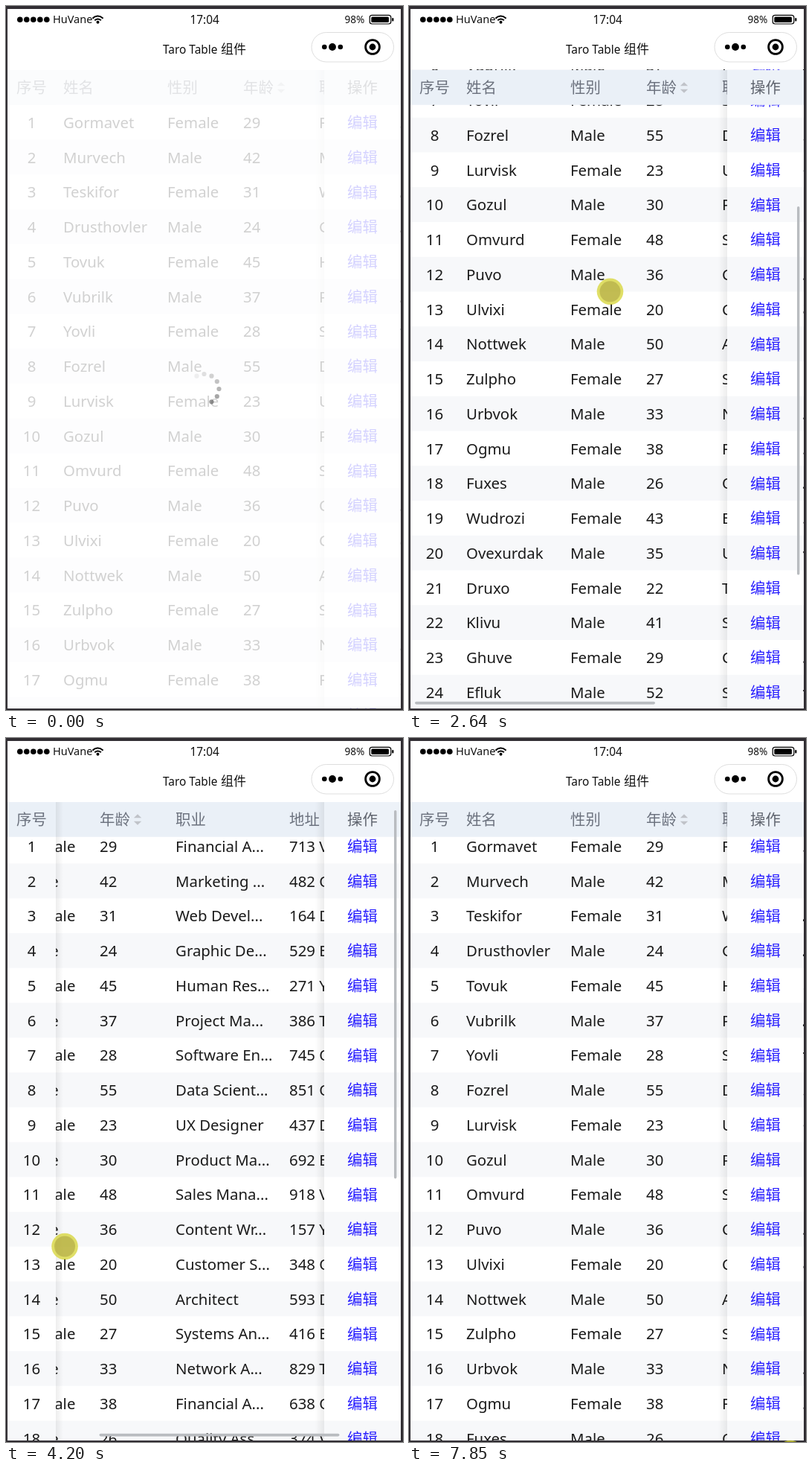
Recreate the animation shown at these times as an HTML page with a canvas. Size 534x945 px, loop 7920 ms.

```html
<!DOCTYPE html>
<html lang="zh">
<head>
<meta charset="utf-8">
<title>Taro Table</title>
<style>
html, body { margin: 0; width: 100%; height: 100%; overflow: hidden; background: #fff; }
canvas { display: block; width: 534px; height: 945px; }
</style>
</head>
<body>
<canvas id="stage"></canvas>
<script>
const W = 534, H = 945, LOOP = 7920;
const canvas = document.getElementById('stage');
const ctx = canvas.getContext('2d');
const dpr = window.devicePixelRatio || 1;
canvas.width = W * dpr;
canvas.height = H * dpr;
ctx.scale(dpr, dpr);

const LATIN = '"Noto Sans", "Open Sans", sans-serif';
const CJK = '"Noto Sans CJK SC", "Noto Sans CJK", sans-serif';
const INK = '#1a1a1a', LINK = '#2a20ff', HEAD_BG = '#eaf0f7', HEAD_INK = '#6c727e';
const ROW = 46.75, TOP = 86, BODY = TOP + ROW, LEFT = 2, RIGHT = 531, BOTTOM = 943;
const FIX_L = 67, FIX_R = 428, FIX_END = 530;
const MAX_H = 299;

// name | sex | age | job | address
const people = `Gormavet|F|29|Financial A...|713 Velph St
Murvech|M|42|Marketing ...|482 Quib Ave
Teskifor|F|31|Web Devel...|164 Drovu Ln
Drusthovler|M|24|Graphic De...|529 Ezk Blvd
Tovuk|F|45|Human Res...|271 Ymo Dr
Vubrilk|M|37|Project Ma...|386 Trelb Rd
Yovli|F|28|Software En...|745 Quolve Ct
Fozrel|M|55|Data Scient...|851 Quib Ave
Lurvisk|F|23|UX Designer|437 Drovu St
Gozul|M|30|Product Ma...|692 Ezk Ave
Omvurd|F|48|Sales Mana...|918 Velph Blvd
Puvo|M|36|Content Wr...|157 Ymo Rd
Ulvixi|F|20|Customer S...|348 Quib Ct
Nottwek|M|50|Architect|593 Drovu Ln
Zulpho|F|27|Systems An...|416 Ezk Blvd
Urbvok|M|33|Network A...|829 Trelb Dr
Ogmu|F|38|Financial A...|638 Quolve Rd
Fuxes|M|26|Quality Ass...|374 Velph St
Wudrozi|F|43|Event Plan...|265 Quib Ave
Ovexurdak|M|35|UI Designer|951 Drovu Ln
Druxo|F|22|Teacher|148 Ezk Blvd
Klivu|M|41|Sales Mana...|537 Ymo Dr
Ghuve|F|29|Content Wr...|726 Trelb Rd
Efluk|M|52|Software En...|843 Quolve Ct
Wiv|F|21|Accountant|319 Quib Ave
Tozbelvi|F|25|Marketing ...|462 Drovu St
Gukh|M|31|UX Resear...|685 Ezk Ave
Diwu|M|32|IT Support...|974 Velph Blvd
Pungovim|M|34|UI Develop...|183 Ymo Rd
Rozvek|M|39|Consultant|357 Quib Ct`.split('\n').map((line, i) => {
  const [name, sex, age, job, address] = line.split('|');
  return { i, age: +age, cells: [name, sex === 'F' ? 'Female' : 'Male', age, job, address] };
});
const byAge = [...people].sort((a, b) => a.age - b.age || b.i - a.i);
const columns = [['姓名', 77], ['性别', 217], ['年龄', 319], ['职业', 421], ['地址', 574]];

// pointer path: time, x, y
const path = [
  [1550, 274, 922], [1790, 267, 712], [1950, 268, 694], [2180, 268, 693.5], [2330, 269, 640],
  [2410, 269, 585], [2640, 270.5, 383.5], [2790, 271, 350], [2880, 271, 362], [3180, 272, 682.5],
  [3260, 262, 682.5], [3660, -32, 682.5], [3800, -32, 682.5], [4000, -18, 682.5],
  [4580, 262, 682.5], [4680, 272, 680], [4820, 290, 540], [5130, 342, 121], [5440, 340, 118],
  [5980, 340, 117], [6950, 340, 118], [7070, 360, 210], [7310, 490, 919]
];

const clamp = (v, lo, hi) => Math.min(hi, Math.max(lo, v));
const ramp = (t, a, b) => clamp((t - a) / (b - a), 0, 1);
const within = (t, a, b) => t >= a && t < b;

function pointer(t) {
  if (t >= 7850) return [513, 960.5];
  let k = 1;
  while (k < path.length - 1 && path[k][0] < t) k++;
  const [a, x, y] = path[k - 1], [b, u, v] = path[k];
  const p = ramp(t, a, b);
  return [x + (u - x) * p, y + (v - y) * p];
}

function rect(x, y, w, h, color) {
  ctx.fillStyle = color;
  ctx.fillRect(x, y, w, h);
}

function disc(x, y, r, color) {
  ctx.fillStyle = color;
  ctx.beginPath();
  ctx.arc(x, y, r, 0, Math.PI * 2);
  ctx.fill();
}

function pill(x, y, w, h, r, color, line) {
  ctx.beginPath();
  ctx.roundRect(x, y, w, h, r);
  if (line) {
    ctx.strokeStyle = color;
    ctx.lineWidth = line;
    ctx.stroke();
  } else {
    ctx.fillStyle = color;
    ctx.fill();
  }
}

function text(s, x, y, color, size = 20.4, family = LATIN, weight = 400) {
  ctx.font = `${weight} ${size}px ${family}`;
  ctx.fillStyle = color;
  ctx.fillText(s, x, y);
}

const han = (s, x, y, color, size = 20.4) => text(s, x, y, color, size, CJK, 300);
const thin = (s, x, y, size) => text(s, x, y, '#111', size, LATIN, 300);

function clipped(x, y, r, b, draw) {
  ctx.save();
  ctx.beginPath();
  ctx.rect(x, y, r - x, b - y);
  ctx.clip();
  draw();
  ctx.restore();
}

function shade(x0, x1) {
  const g = ctx.createLinearGradient(x0, 0, x1, 0);
  g.addColorStop(0, 'rgba(0,0,0,0)');
  g.addColorStop(1, 'rgba(0,0,0,.07)');
  rect(Math.min(x0, x1), TOP, Math.abs(x1 - x0), BOTTOM - TOP, g);
}

function sortIcon(x, y, color) {
  ctx.fillStyle = color;
  for (const d of [-1, 1]) {
    ctx.beginPath();
    ctx.moveTo(x - 5.2, y + d * 2.2);
    ctx.lineTo(x + 5.2, y + d * 2.2);
    ctx.lineTo(x, y + d * 7.2);
    ctx.fill();
  }
}

function table(sx, sy, sorted) {
  const rows = sorted ? byAge : people;
  const eachRow = fn => rows.forEach((p, i) => {
    const y = BODY + i * ROW - sy;
    if (y < BOTTOM && y + ROW > 84) fn(p, i, y);
  });
  const stripes = (x, r) => eachRow((p, i, y) =>
    rect(x, y, r - x, ROW + .5, i % 2 ? '#f7f8fa' : '#ffffff'));

  stripes(LEFT, RIGHT);
  if (sorted) rect(308.5 - sx, BODY, 102, BOTTOM - BODY, '#ebfbff');
  eachRow((p, i, y) => p.cells.forEach((s, c) => text(s, columns[c][1] - sx, y + 31, INK)));
  rect(LEFT, TOP, RIGHT - LEFT, ROW, HEAD_BG);
  columns.forEach(([s, x]) => han(s, x - sx, 117.3, HEAD_INK));
  sortIcon(370 - sx, 109.5, sorted ? '#a9adb5' : '#c0c3c9');

  shade(416, FIX_R);
  if (sx > 0) shade(FIX_L + 10, FIX_L);

  clipped(LEFT, 85, FIX_L, BOTTOM, () => {
    stripes(LEFT, FIX_L);
    ctx.textAlign = 'center';
    eachRow((p, i, y) => text(i + 1, 34.5, y + 31, INK));
    ctx.textAlign = 'left';
    rect(LEFT, TOP, FIX_L - LEFT, ROW, HEAD_BG);
    han('序号', 14, 117.3, HEAD_INK);
  });
  clipped(FIX_R, 85, FIX_END, BOTTOM, () => {
    stripes(FIX_R, FIX_END);
    eachRow((p, i, y) => han('编辑', 459, y + 31.4, LINK));
    rect(FIX_R, TOP, FIX_END - FIX_R, ROW, '#edf2f8');
    han('操作', 459, 117.3, '#5f646e');
  });
}

function scrollbars(sx, sy, alpha) {
  if (!alpha) return;
  ctx.globalAlpha = alpha;
  pill(522, 90.7 + sy * .575, 3.4, 494.5, 1.7, '#b9bcc0');
  pill(8 + sx * .609, 933.8, 323, 3.6, 1.8, '#b9bcc0');
  ctx.globalAlpha = 1;
}

function loading(t) {
  const alpha = 1 - ramp(t, 1010, 1240);
  if (!alpha) return;
  ctx.globalAlpha = alpha;
  rect(LEFT, 85, RIGHT - LEFT, BOTTOM - 85, 'rgba(255,255,255,.8)');
  const head = 2 + Math.floor((t + 15) / (1000 / 12));
  for (let k = 0; k < 7; k++) {
    const a = (head - k) * Math.PI / 6;
    disc(266.5 + 20 * Math.cos(a), 514 + 20 * Math.sin(a), 3.1, `rgba(70,70,70,${.56 - k * .08})`);
  }
  ctx.globalAlpha = 1;
}

function navBar() {
  rect(LEFT, 3, RIGHT - LEFT, 82, '#fff');
  for (let i = 0; i < 5; i++) disc(18.8 + i * 9, 18.2, 3.8, '#000');
  thin('HuVane', 63, 23, 14.5);
  ctx.strokeStyle = '#000';
  ctx.lineWidth = 2;
  for (const r of [5.6, 9.4]) {
    ctx.beginPath();
    ctx.arc(123.5, 23, r, -Math.PI * .77, -Math.PI * .23);
    ctx.stroke();
  }
  disc(123.5, 21.8, 2, '#000');
  thin('17:04', 247.5, 23.6, 15.4);
  thin('98%', 455.5, 23.4, 13.6);
  pill(489.2, 12.4, 28.6, 11.6, 3, '#000', 1.2);
  pill(491.3, 14.4, 23.6, 7.6, 1.5, '#000');
  pill(519.2, 16, 2.2, 4.6, 1, '#000');

  thin('Taro Table', 211, 63.8, 15.4);
  han('组件', 289, 64, '#111', 17);
  pill(411, 35.5, 110.5, 39.5, 19.75, '#dedede', 1);
  disc(428.3, 55, 3.3, '#000');
  disc(439, 55, 4.9, '#000');
  disc(449.8, 55, 3.3, '#000');
  disc(493, 55, 4.4, '#000');
  ctx.strokeStyle = '#000';
  ctx.lineWidth = 2.8;
  ctx.beginPath();
  ctx.arc(493, 55, 9.4, 0, Math.PI * 2);
  ctx.stroke();
}

function bezel() {
  const c = '#312e33';
  rect(0, 0, W, 4, c);
  rect(0, 0, 2, H, c);
  rect(RIGHT, 0, 3, H, c);
  rect(0, BOTTOM, W, 2, c);
}

function drawPointer(t, x, y, pressed) {
  if (!within(t, 1550, 7375) && t < 7850) return;
  if (pressed) {
    disc(x, y, 17.8, 'rgba(214,212,50,.74)');
    disc(x, y, 14, 'rgba(130,115,40,.32)');
  } else {
    disc(x, y, 17.2, 'rgba(120,120,120,.55)');
    disc(x, y, 13.6, 'rgba(70,70,70,.42)');
  }
}

function render(t) {
  const [x, y] = pointer(t);
  const dragging = within(t, 2180, 4700);
  const sy = t < 2180 ? 0 : t < 3180 ? clamp(693.5 - y, 0, 636) : 11;
  const sx = within(t, 3180, 4680) ? clamp(272 - x, 0, MAX_H) : 0;
  const sorted = within(t, 5970, 6595);
  const pressed = dragging || within(t, 5970, 6055) || within(t, 6595, 6755) || t >= 7850;

  rect(0, 0, W, H, '#fff');
  clipped(LEFT, 84.5, RIGHT, BOTTOM, () => {
    table(sx, sy, sorted);
    scrollbars(sx, sy, ramp(t, 1750, 2050) * (1 - ramp(t, 4760, 5040)));
    loading(t);
  });
  navBar();
  bezel();
  drawPointer(t, x, y, pressed);
}

const start = performance.now();
function tick() {
  render((performance.now() - start) % LOOP);
  requestAnimationFrame(tick);
}
tick();
</script>
</body>
</html>
```
